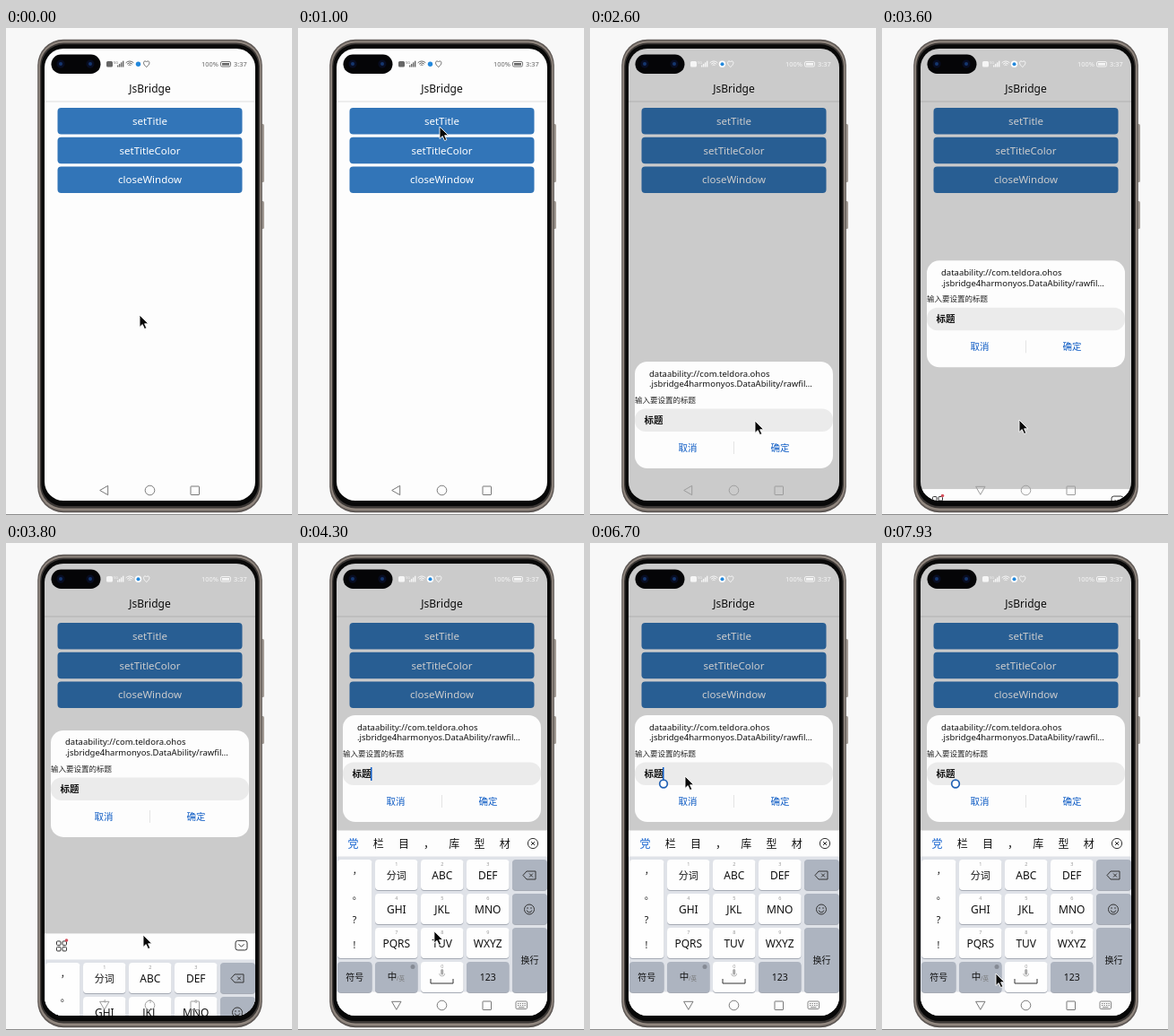
An HTML page with a canvas for the animation above (8 s loop, 319 by 543 pixels).

```html
<!DOCTYPE html>
<html lang="zh">
<head>
<meta charset="utf-8">
<title>JsBridge</title>
<style>
html, body { margin: 0; width: 100%; height: 100%; overflow: hidden; background: #f8f8f8; }
canvas { display: block; width: 319px; height: 543px; }
</style>
</head>
<body>
<canvas id="stage"></canvas>
<script>
const W = 319, H = 543, LOOP = 8000, TAU = Math.PI * 2;
const FONT = '"Noto Sans", "Noto Sans CJK SC", "Noto Sans CJK", sans-serif';
const screen = { x: 43, y: 23, w: 235, h: 504 }, middle = 160.5;
const canvas = document.getElementById('stage');
const ctx = canvas.getContext('2d');
const density = Math.max(1, window.devicePixelRatio || 1);
canvas.width = W * density;
canvas.height = H * density;

const clamp = v => Math.min(1, Math.max(0, v));
const ramp = (t, from, to) => clamp((t - from) / (to - from));
const smooth = p => p * p * (3 - 2 * p);
const mix = (a, b, p) => a + (b - a) * p;
const repeat = (count, draw) => { for (let i = 0; i < count; i++) draw(i); };

// Each pointer move eases from wherever the previous one ended.
const moves = [
  { from: 20, to: 100, x: 157, y: 298 },
  { from: 250, to: 1000, x: 158, y: 110 },
  { from: 1800, to: 2300, x: 184, y: 438 },
  { from: 2600, to: 3100, x: 153, y: 437 },
  { from: 4250, to: 4800, x: 106, y: 260 },
  { from: 7350, to: 7900, x: 127, y: 480 }
];

function pointerAt(t) {
  return moves.reduce((at, move) => {
    const p = smooth(ramp(t, move.from, move.to));
    return { x: mix(at.x, move.x, p), y: mix(at.y, move.y, p) };
  }, { x: 149, y: 320 });
}

function paint(fill, stroke, width = 1) {
  if (fill) { ctx.fillStyle = fill; ctx.fill(); }
  if (stroke) { ctx.strokeStyle = stroke; ctx.lineWidth = width; ctx.stroke(); }
}

function rect(x, y, w, h, color) {
  ctx.fillStyle = color;
  ctx.fillRect(x, y, w, h);
}

function box(x, y, w, h, r, fill, stroke, width) {
  ctx.beginPath();
  ctx.roundRect(x, y, w, h, r);
  paint(fill, stroke, width);
}

function arc(x, y, r, from, to, stroke, width) {
  ctx.beginPath();
  ctx.arc(x, y, r, from, to);
  paint(null, stroke, width);
}

function circle(x, y, r, fill, stroke, width) {
  ctx.beginPath();
  ctx.arc(x, y, r, 0, TAU);
  paint(fill, stroke, width);
}

function path(d, fill, stroke, width = 1) {
  const shape = new Path2D(d);
  if (fill) { ctx.fillStyle = fill; ctx.fill(shape); }
  if (stroke) { ctx.strokeStyle = stroke; ctx.lineWidth = width; ctx.stroke(shape); }
}

function triangle(x, y, r, angle, stroke) {
  ctx.beginPath();
  repeat(3, i => ctx.lineTo(x + r * Math.cos(angle + i * TAU / 3), y + r * Math.sin(angle + i * TAU / 3)));
  ctx.closePath();
  paint(null, stroke);
}

function cross(x, y, r) {
  path(`M${x - r} ${y - r}l${2 * r} ${2 * r}m0 ${-2 * r}l${-2 * r} ${2 * r}`, null, '#333');
}

function label(text, x, y, size, color = '#111', align = 'center', weight = 400) {
  ctx.font = `${weight} ${size}px ${FONT}`;
  ctx.textAlign = align;
  ctx.fillStyle = color;
  ctx.fillText(text, x, y);
}

// A rounded frame that grows outwards from the screen.
function rim(margin, color) {
  const { x, y, w, h } = screen;
  box(x - margin, y - margin * 1.3, w + 2 * margin, h + margin * 3, 21 + margin, color);
}

function drawBody() {
  rect(0, 0, W, H, '#f8f8f8');
  rect(0, 542, W, 1, '#8c8c8c');
  box(283, 107, 5, 65, 1.5, '#a39b95');
  box(283, 193, 5, 31, 1.5, '#a39b95');
  rim(7.8, '#5e5855');
  rim(6.6, '#91877f');
  rim(5, '#3b3735');
  rim(3.6, '#080808');
}

function drawPage() {
  rect(screen.x, screen.y, screen.w, screen.h, '#fdfdfd');
  rect(screen.x, 81.5, screen.w, 1, '#dedede');
  label('JsBridge', middle, 71.5, 12);
  ['setTitle', 'setTitleColor', 'closeWindow'].forEach((name, i) => {
    const y = 89 + i * 32.8;
    box(57.5, y, 206, 29.5, 4, '#3275b8');
    label(name, middle, y + 18.8, 11.5, '#fff');
  });
}

function drawStatus(light) {
  const ink = light ? '#f6f6f6' : '#666';
  box(112, 37, 7, 6.5, 1.5, ink);
  label('5G', 122.5, 39.5, 3.8, ink);
  repeat(4, i => rect(124 + i * 2, 41.5 - i * 1.6, 1.4, 2 + i * 1.6, ink));
  repeat(3, i => arc(138, 43, 2 + i * 2, -TAU * .38, -TAU * .12, ink));
  if (light) circle(147.5, 40.3, 3.7, '#fff');
  circle(147.5, 40.3, light ? 2 : 2.7, '#2388dc');
  path('M156.7 43.5c-6-4.5-2-8.5 0-5.5c2-3 6 1 0 5.5', null, ink);
  label('100%', 218, 43, 7.4, ink, 'left');
  box(239.5, 37.5, 11, 5.5, 1.5, null, ink, .9);
  rect(241, 39, 8, 2.6, ink);
  label('3:37', 254, 43, 7.4, ink, 'left');
}

function drawNotch() {
  box(50.5, 29.5, 55, 21.5, 10.7, '#050507');
  for (const x of [61, 94]) {
    circle(x, 40, 4.5, '#080d22');
    circle(x, 40, 2, '#15366e');
  }
}

function drawDialog(top, shown, t) {
  const blue = '#0d5bc4', scale = mix(.975, 1, shown);
  ctx.save();
  ctx.globalAlpha = mix(.65, 1, shown);
  ctx.translate(middle, top + 59.5);
  ctx.scale(scale, scale);
  ctx.translate(-middle, -59.5);
  box(50, 0, 221, 119, 14, mix(0, 1, shown) < 1 ? '#f4f4f4' : '#fdfdfd');
  label('dataability://com.teldora.ohos', 66, 16.5, 9.5, '#111', 'left');
  label('.jsbridge4harmonyos.DataAbility/rawfil…', 66, 28.3, 9.5, '#111', 'left');
  label('输入要设置的标题', 50, 46, 8.5, '#222', 'left');
  box(50, 52.5, 221, 25.5, 12, '#ebebeb');
  label('标题', 60.5, 69, 10.5, '#111', 'left', 700);
  label('取消', 109, 100, 10.5, blue, 'center', 500);
  label('确定', 212, 100, 10.5, blue, 'center', 500);
  rect(160, 89, 1, 14, '#e4e4e4');
  if (t >= 4300 && (t - 4300) % 1000 < 500) rect(81, 58, 1.5, 15, blue);
  if (t >= 6500) circle(82, 76.5, 4.3, '#fff', '#2463b5', 1.7);
  ctx.restore();
}

function drawToolbar() {
  repeat(4, i => box(56.5 + i % 2 * 6.5, 329 + (i >> 1) * 6.5, 4.5, 4.5, 1, null, '#333'));
  circle(67.5, 328, 1.8, '#d4505c');
  box(256, 328.5, 13, 10.5, 2.5, null, '#333');
  path('M259.5 332.3l3 3l3-3', null, '#333');
}

function drawCandidates() {
  [...'党栏目，库型材'].forEach((c, i) =>
    label(c, 61.5 + i * 28.2, 339.5, 12, i ? '#111' : '#1664d0'));
  circle(262, 335, 5.6, null, '#333');
  cross(262, 335, 2);
}

const GRAY = '#adb4c0', WHITE = '#fefefe';

// Keys sit on a grid of five columns; the outer two run past the screen's edges.
function key(col, row, { fill = WHITE, span = 1, text = '', size = 10, hint = '' } = {}) {
  const x = 35 + col * 51, y = 353 + row * 38, h = span * 38 - 4;
  const left = Math.max(x, screen.x + 1), right = Math.min(x + 47.5, screen.x + screen.w);
  const center = (left + right) / 2;
  box(left, y + 1, right - left, h, 4, '#a5aab4');
  box(left, y, right - left, h, 4, fill);
  label(hint, center, y + 7, 5.5, '#999');
  label(text, center, y + h / 2 + size * .42, size);
}

function drawKeys() {
  key(0, 0, { span: 3 });
  [...'，。?!'].forEach((c, i) => label(c, i < 2 ? 66 : 63, 369 + i * 27.5, 10.5));
  ['分词', 'ABC', 'DEF', 'GHI', 'JKL', 'MNO', 'PQRS', 'TUV', 'WXYZ'].forEach((text, i) =>
    key(1 + i % 3, Math.floor(i / 3), { text, size: i ? 12 : 11, hint: i + 1 }));

  key(4, 0, { fill: GRAY });
  path('M251 370.5l4-4.5h10v9h-10z', null, '#333');
  cross(260, 370.5, 2);
  key(4, 1, { fill: GRAY });
  circle(258, 408.5, 5.5, null, '#333');
  for (const side of [-2, 2]) circle(258 + side, 407, .8, '#333');
  arc(258, 409, 2.8, .2, Math.PI - .2, '#333');
  key(4, 2, { fill: GRAY, span: 2, text: '换行' });

  key(0, 3, { fill: GRAY, text: '符号' });
  key(1, 3, { fill: GRAY });
  label('中', 105, 487, 10.5);
  label('/英', 114.5, 488, 6.5, '#777');
  circle(128, 472.5, 2.5, '#858a94');
  key(2, 3, { hint: '0' });
  box(159.2, 475, 3, 6.5, 1.5, '#aaa');
  arc(160.7, 480, 3, 0, Math.PI, '#aaa', .8);
  path('M148 486v5h25v-5', null, '#333');
  key(3, 3, { fill: GRAY, text: '123', size: 10.5 });
}

function drawKeyboard(offset, typing) {
  const { x, w } = screen;
  ctx.save();
  ctx.translate(0, offset);
  rect(x, 320.5, w, 207, '#fdfdfd');
  rect(x, 349.5, w, 151, '#dfe2e8');
  typing ? drawCandidates() : drawToolbar();
  drawKeys();
  ctx.restore();
}

function drawNav(rise, dimmed) {
  const ready = rise === 1, ink = dimmed && !ready ? '#9c9c9c' : '#777';
  if (rise) triangle(109.8, 514.3, 6, TAU / 4, ink);
  else triangle(110.7, 515.5, 6, TAU / 2, ink);
  circle(middle, 515.5, 5.3, null, ink);
  box(206, 511, 9.5, 9.5, .5, null, ink);
  if (!ready) return;
  box(243, 511, 12.5, 8.5, 1.2, null, ink, .9);
  repeat(8, i => rect(245 + i % 4 * 2.5, 513 + (i >> 2) * 2, 1.3, 1, ink));
  rect(246, 517.2, 6.5, .9, ink);
}

function drawPointer({ x, y }) {
  ctx.save();
  ctx.translate(x, y);
  ctx.lineJoin = 'round';
  path('M0 0v13.5l3.2-2.9l2.3 5l2.3-1l-2.2-4.8h4.2z', '#080808', '#fff', .9);
  ctx.restore();
}

function draw(t) {
  const { x, y, w, h } = screen;
  const shown = t < 1800 ? 0 : ramp(t, 1680, 1950);
  const lift = 1 - Math.pow(1 - ramp(t, 3400, 4200), 3.4);
  const rise = smooth(ramp(t, 3500, 4150));
  ctx.setTransform(density, 0, 0, density, 0, 0);
  drawBody();
  ctx.save();
  ctx.beginPath();
  ctx.roundRect(x, y, w, h, 21);
  ctx.clip();
  drawPage();
  rect(x, y, w, h, `rgba(0,0,0,${.2 * shown})`);
  drawStatus(shown > 0);
  if (shown) drawDialog(mix(372, 192, lift), shown, t);
  if (rise) drawKeyboard(207 * (1 - rise), t >= 4300);
  drawNav(rise, shown > 0);
  drawNotch();
  ctx.restore();
  drawPointer(pointerAt(t));
}

function tick() {
  draw(performance.now() % LOOP);
  requestAnimationFrame(tick);
}
tick();
</script>
</body>
</html>
```
